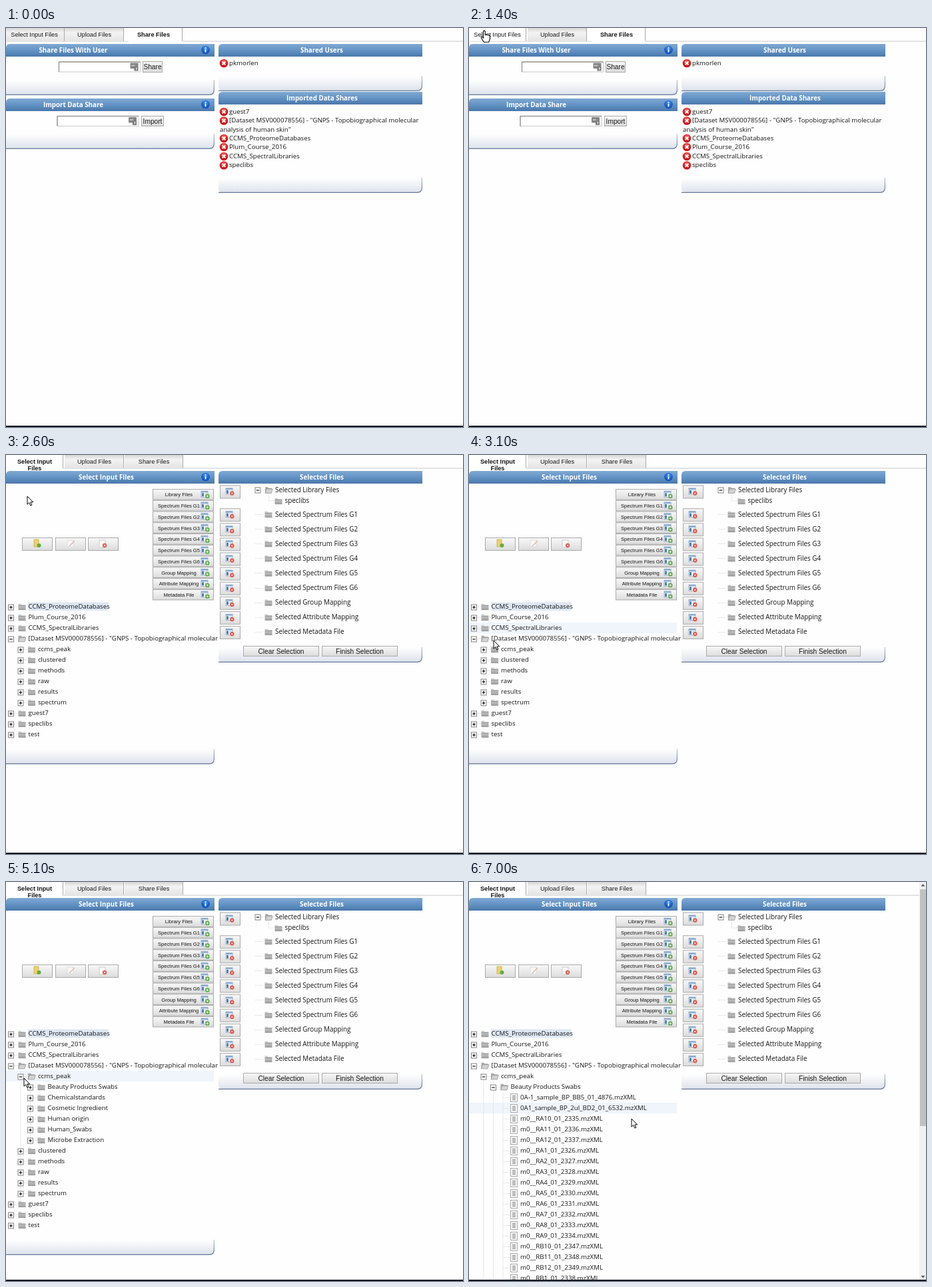
An HTML page that plays this animation: 686 px wide and 600 px high, repeating every 7100 ms.

```html
<!DOCTYPE html>
<html lang="en">
<head>
<meta charset="utf-8">
<title>File sharing</title>
<style>
html, body { margin: 0; width: 100%; height: 100%; overflow: hidden; background: #fefefe; }
svg { display: block; width: 686px; height: 600px; }
text { font: 9.7px "Open Sans", "Noto Sans", sans-serif; fill: #161616; }
.head { font-weight: 700; font-size: 9.8px; fill: #fff; text-anchor: middle; }
.tab, .button, .small { font-family: "Liberation Sans", Arial, sans-serif; text-anchor: middle; }
.tab { font-size: 9.2px; }
.bold { font-weight: 700; }
.button { font-size: 10.2px; }
.small { font-size: 7.6px; }
.list { font-size: 9.9px; }
.dots { stroke: #d6d6d6; stroke-dasharray: 1 1; fill: none; }
</style>
</head>
<body>
<svg viewBox="0 0 686 600">
  <defs>
    <linearGradient id="blue" x2="0" y2="1"><stop stop-color="#80a9d2"/><stop offset=".5" stop-color="#6393c5"/><stop offset="1" stop-color="#4a78ab"/></linearGradient>
    <linearGradient id="foot" x2="0" y2="1"><stop stop-color="#fff"/><stop offset="1" stop-color="#dce1eb"/></linearGradient>
    <linearGradient id="edge" x2="0" y2="1"><stop stop-color="#c5cedb"/><stop offset="1" stop-color="#62789a"/></linearGradient>
    <linearGradient id="btn" x2="0" y2="1"><stop stop-color="#f8f8f8"/><stop offset="1" stop-color="#dcdcdc"/></linearGradient>
    <linearGradient id="tabFill" x2="0" y2="1"><stop stop-color="#d6d6d6"/><stop offset=".35" stop-color="#f3f3f3"/><stop offset="1" stop-color="#e4e4e4"/></linearGradient>
    <linearGradient id="grey" x2="0" y2="1"><stop stop-color="#d0d0d0"/><stop offset="1" stop-color="#a0a0a0"/></linearGradient>
    <radialGradient id="red" cy=".3"><stop stop-color="#f36b62"/><stop offset="1" stop-color="#c9181b"/></radialGradient>
    <radialGradient id="info" cy=".3"><stop stop-color="#4c9cf4"/><stop offset="1" stop-color="#1458c0"/></radialGradient>
    <clipPath id="leftClip"><rect width="318" height="598"/></clipPath>
    <g id="remove"><circle r="6.3" fill="url(#red)"/><path d="M-2.4-2.4 2.4 2.4M2.4-2.4-2.4 2.4" stroke="#fff" stroke-width="2"/></g>
    <g id="infoIcon"><circle r="6.3" fill="url(#info)"/><path d="M0-3.7v1.6M0-1v4.6" stroke="#fff" stroke-width="1.7"/></g>
    <g id="folder"><path d="M-5.5 4.8v-9h4l1 1.4h6v7.6z" fill="url(#grey)"/><path d="M-5.5-1.4h11M-5 4.6h10.5" stroke="#858585" stroke-width=".7"/></g>
    <g id="openFolder"><path d="M-5.5 4.8v-9h4l1 1.4h5v2" fill="#aaa"/><path d="M-5.5 4.8l2-6.2h9.3l-1.8 6.2z" fill="#d3d3d3" stroke="#888" stroke-width=".7"/></g>
    <g id="page"><rect x="-5" y="-6" width="10" height="12" fill="#f8f8f8" stroke="#a2a2a2" stroke-width=".9"/><path d="M-2.5-3h5M-2.5-1h5M-2.5 1h5M-2.5 3h5" stroke="#777" stroke-width=".9"/></g>
    <g id="minus"><rect x="-4" y="-4" width="8" height="8" fill="#fff" stroke="#848484"/><path d="M-2.2 0h4.4" stroke="#111" stroke-width="1.2"/></g>
    <g id="plus"><use href="#minus"/><path d="M0-2.2v4.4" stroke="#111" stroke-width="1.2"/></g>
    <g id="sheet"><rect x="-6" y="-5" width="10" height="9" fill="#fff" stroke="#87a0bd" stroke-width=".8"/><rect x="-6" y="-5" width="10" height="2.2" fill="#86aad2"/><rect x="-5" y="-2" width="3" height="5" fill="#4d7daf"/><path d="M-1-1h4M-1 1h4" stroke="#aaa" stroke-width=".7"/></g>
    <g id="sheetAdd"><use href="#sheet"/><circle cx="3.3" cy="2.6" r="3.2" fill="#55a943"/><path d="M1.5 2.6h3.6M3.3.8v3.6" stroke="#fff"/></g>
    <g id="sheetDrop"><use href="#sheet"/><circle cx="3.3" cy="2.6" r="3.2" fill="#db5346"/><path d="M2 1.3l2.6 2.6m0-2.6L2 3.9" stroke="#fff" stroke-width=".9"/></g>
    <g id="keyIcon"><rect x="-6" y="-6" width="12" height="8.5" rx="1" fill="#858585"/><path d="M-4-2h5" stroke="#fff" stroke-width="1.3" stroke-dasharray="1.3 .8"/><path d="M0 0h6v6H0z" fill="#777"/><path d="M2 1.5h2v1.5H3v2" stroke="#fff" stroke-width=".8" fill="none"/></g>
    <path id="arrow" d="M0 0v12.2l2.8-2.6 2 4.5 2-.9-2-4.3h3.9z" fill="#fff" stroke="#000"/>
    <path id="hand" d="M-1.5 1q1.4-1.8 2.8 0v5.3q1.3-1 2.6.2 1.4-.8 2.4.5 1.7-.4 2.2 1.2v4.3l-1.8 4.7H-.6l-4-6.2q-.6-2.2 1.3-1.8L-1.5 11z" fill="#fff" stroke="#000" stroke-width="1.1"/>
  </defs>
  <g id="stage"></g>
</svg>
<script>
const LOOP = 7100, STEP = 100;
const SWITCH_AT = 2400, OPEN_FOLDER_AT = 4700, OPEN_FILES_AT = 6700;
const stage = document.getElementById('stage');
const DATASET = '[Dataset MSV000078556] - "GNPS - Topobiographical molecular';
const COURSE = 'Plum_Course_2016';

// time, x, y of the pointer tip
const PATH = [
  [100, 530, 560], [500, 492, 365], [800, 428, 182], [1200, 62, 18], [1400, 23, 4],
  [2200, 31, 6], [2400, 31, 8], [2600, 32, 62], [3000, 36, 262], [3100, 37, 279],
  [4100, 34, 296], [4500, 21, 291], [4700, 21, 291], [5100, 27, 295],
  [5700, 35, 306], [6700, 36, 306], [6900, 190, 341], [7000, 244, 356]
];

const text = (x, y, label, cls = '') => `<text x="${x}" y="${y + 3.5}" class="${cls}">${label}</text>`;
const icon = (name, x, y) => `<use href="#${name}" x="${x}" y="${y}"/>`;
const rect = (x, y, w, h, fill, extra = '') => `<rect x="${x}" y="${y}" width="${w}" height="${h}" fill="${fill}" ${extra}/>`;
const path = (d, extra) => `<path d="${d}" ${extra}/>`;
const dots = d => path(d, 'class="dots"');
const range = (n, fn) => Array.from({ length: n }, (_, i) => fn(i)).join('');
const box = (x, y, w, h) => rect(x + .5, y + .5, w - 1, h - 1, 'url(#btn)', 'stroke="#aaa"');
const button = (x, y, w, h, label) => box(x, y, w, h) + text(x + w / 2, y + h / 2, label, 'button');

function panel(x, right, top, bottom, title, titleX, info) {
  const f = bottom - 23;
  return path(`M${x} ${f}H${right}V${bottom - 8}Q${right} ${bottom} ${right - 8} ${bottom}H${x + (x ? 7 : 0)}${x ? `Q${x} ${bottom} ${x} ${bottom - 7}` : ''}Z`, 'fill="url(#foot)"')
    + path(`M${x} ${bottom - .7}H${right - 8}Q${right - .6} ${bottom - .7} ${right - .6} ${bottom - 8}V${f}`, 'fill="none" stroke="url(#edge)" stroke-width="1.3"')
    + path(`M${x} ${top + 19}V${top + 6}Q${x} ${top} ${x + 6} ${top}H${right}V${top + 19}Z`, 'fill="url(#blue)"')
    + text(titleX, top + 9, title, 'head')
    + (info ? icon('infoIcon', 299.5, top + 9) : '');
}

function tab(x, w, fill, label, cls = '') {
  return rect(x, 0, w, 19.5, fill)
    + path(`M${x + w - .5} 0V19.5`, 'stroke="#aaa"')
    + (label ? text(x + w / 2, 9, label, 'tab ' + cls) : '');
}

function tabs(sharing, hovering) {
  const line = path(sharing ? 'M0 20H184M265 20H686' : 'M85 20H686', 'stroke="#c9c9c9"');
  return sharing
    ? line + tab(0, hovering ? 86 : 88, hovering ? '#fff' : 'url(#tabFill)', '') + text(42.5, 9, 'Select Input Files', 'tab')
      + tab(88, 89, 'url(#tabFill)', 'Upload Files') + tab(178, 87, '#fff', 'Share Files', 'bold')
    : line + tab(0, 86, '#fff', '') + text(43, 9, 'Select Input', 'tab bold') + text(43, 19.5, 'Files', 'tab bold')
      + tab(88, 89, 'url(#tabFill)', 'Upload Files') + tab(178, 88, 'url(#tabFill)', 'Share Files');
}

function field(x, y) {
  return rect(x, y, 122, 15, '#fff', 'stroke="#c8c8c8"')
    + path(`M${x} ${y + 15}V${y}H${x + 122}`, 'fill="none" stroke="#777"') + icon('keyIcon', x + 113, y + 7.5);
}

function sharePage() {
  const shares = [[125, 'guest7'], [138.5, DATASET], [165, 'CCMS_ProteomeDatabases'], [178, COURSE],
    [192, 'CCMS_SpectralLibraries'], [205.5, 'speclibs']];
  const entry = ([y, label]) => icon('remove', 327, y + 1) + text(335, y, label);
  return panel(0, 313, 24, 101, 'Share Files With User', 101, true)
    + field(79.5, 51) + button(205, 50, 30, 17, 'Share')
    + panel(0, 313, 106, 182, 'Import Data Share', 101, true)
    + field(77, 132.5) + button(203, 132, 34, 16, 'Import')
    + panel(319, 625, 24, 95, 'Shared Users', 474) + entry([52, 'pkmorlen'])
    + panel(319, 625, 96, 248, 'Imported Data Shares', 474.5)
    + shares.map(entry).join('') + text(321, 152, 'analysis of human skin"');
}

function sampleFile(i) {
  const n = (i + 9) % 12 + 1, block = Math.floor(i / 12);
  return `m0__R${'AB'[block]}${n}_01_${2325 + n + 12 * block}.mzXML`;
}

// rows as [depth, label, icon]
function treeRows(level) {
  const closed = (depth, names) => names.map(name => [depth, name, 'plus']);
  const swabs = level < 2 ? closed(2, ['Beauty Products Swabs']) : [
    [2, 'Beauty Products Swabs', 'minus'],
    ...['0A-1_sample_BP_BB5_01_4876.mzXML', '0A1_sample_BP_2ul_BD2_01_6532.mzXML',
      ...Array.from({ length: 16 }, (_, i) => sampleFile(i))].map(name => [3, name, 'page'])];
  const peak = level < 1 ? [] : [...swabs, ...closed(2, ['Chemicalstandards', 'Cosmetic Ingredient',
    'Human origin', 'Human_Swabs', 'Microbe Extraction'])];
  return [
    ...closed(0, ['CCMS_ProteomeDatabases', COURSE, 'CCMS_SpectralLibraries']),
    [0, DATASET, 'minus'], [1, 'ccms_peak', level ? 'minus' : 'plus'], ...peak,
    ...closed(1, ['clustered', 'methods', 'raw', 'results', 'spectrum']),
    ...closed(0, ['guest7', 'speclibs', 'test'])];
}

function tree(rows, hoverY) {
  const hover = Math.floor((hoverY - 220) / 16);
  return rows.map(([depth, label, kind], i) => {
    const y = 228 + 16 * i, x = 7 + 14.5 * depth;
    if (y > 610) return '';
    return (i === hover ? rect(0, y - 8, 312, 16, '#f0f5fb') : '')
      + (i ? '' : rect(33, y - 6.5, 120.5, 12.5, '#dde7f3'))
      + range(depth, d => dots(`M${22 + 14.5 * d} ${y - 8}v16`))
      + dots(`M${x} ${y + .5}h11`)
      + (kind === 'page' ? icon('page', x + 17, y + .5)
        : icon(kind, x + .5, y + 1) + icon(kind === 'minus' ? 'openFolder' : 'folder', x + 17, y))
      + text(x + 26.5, y - .5, label);
  }).join('');
}

function toolbar() {
  const groups = ['Library Files', ...Array.from({ length: 6 }, (_, i) => `Spectrum Files G${i + 1}`),
    'Group Mapping', 'Attribute Mapping', 'Metadata File'];
  const tools = [24, 74, 123].map(x => box(x, 124, 46, 20)).join('')
    + rect(42, 127, 7, 11, '#ecd16e', 'stroke="#c2a743" stroke-width=".7"') + `<circle cx="49.5" cy="136" r="3" fill="#62ac45"/>`
    + rect(92, 128, 9, 10, '#f7f7f7', 'stroke="#ddd"') + path('M95 137l8-8', 'stroke="#d5b9b0" stroke-width="1.5"')
    + rect(140, 128, 9, 11, '#fafafa', 'stroke="#ccc"') + `<circle cx="148" cy="136" r="3.2" fill="#de5b50"/>`
    + path('M146.8 134.8l2.4 2.4m0-2.4l-2.4 2.4', 'stroke="#fff"');
  return tools + groups.map((label, i) => {
    const y = 59.3 + 16.75 * i;
    return box(220, y - 8.2, 92, 16.6) + text(259.5, y - .5, label, 'small') + icon('sheetAdd', 299, y);
  }).join('');
}

function selectedFiles() {
  const drop = y => box(321, y - 9.5, 31, 20) + icon('sheetDrop', 336, y);
  const names = [...Array.from({ length: 6 }, (_, i) => `Spectrum Files G${i + 1}`),
    'Group Mapping', 'Attribute Mapping', 'Metadata File'];
  return panel(319, 625, 24, 312, 'Selected Files', 474)
    + drop(55) + dots('M378 52.5h11M394.5 58v11h9') + icon('minus', 378, 53) + icon('openFolder', 394.5, 52.5)
    + text(404, 52, 'Selected Library Files', 'list') + icon('folder', 409, 69) + text(418.5, 68.5, 'speclibs', 'list')
    + names.map((name, i) => {
      const y = 89 + 22.1 * i;
      return drop(y + .7) + dots(`M374 ${Math.round(y) + .5}h12`) + icon('folder', 394, y)
        + text(404, y, 'Selected ' + name, 'list');
    }).join('')
    + button(356, 287, 114, 16, 'Clear Selection') + button(474, 287, 114, 16, 'Finish Selection');
}

function scrollbar() {
  return rect(676, 0, 10, 598, '#f1f1f1') + rect(677, 11, 9, 356, '#c1c1c1')
    + path('M678.5 6.5l3-3.5 3 3.5zM678.5 592l3 3.5 3-3.5z', 'fill="#555"');
}

function selectPage(t, hoverY) {
  const level = t < OPEN_FOLDER_AT ? 0 : t < OPEN_FILES_AT ? 1 : 2;
  const rows = treeRows(level);
  return `<g clip-path="url(#leftClip)">${panel(0, 313, 24, 257 + 16 * rows.length, 'Select Input Files', 150.5, true)}`
    + toolbar() + tree(rows, hoverY) + '</g>' + selectedFiles() + (level === 2 ? scrollbar() : '');
}

function pointer(t) {
  const next = PATH.findIndex(p => p[0] > t);
  if (next < 0) return PATH[PATH.length - 1].slice(1);
  if (!next) return PATH[0].slice(1);
  const [t0, x0, y0] = PATH[next - 1], [t1, x1, y1] = PATH[next];
  const k = (t - t0) / (t1 - t0);
  return [x0 + (x1 - x0) * k, y0 + (y1 - y0) * k];
}

function draw(t) {
  const sharing = t < SWITCH_AT;
  const [x, y] = pointer(t);
  const hovering = sharing && x < 86 && y < 20;
  stage.innerHTML = tabs(sharing, hovering)
    + (sharing ? sharePage() : selectPage(t, pointer(t - STEP)[1]))
    + rect(0, 598, 686, 2, '#141821')
    + (t >= PATH[0][0] ? icon(hovering ? 'hand' : 'arrow', x, y) : '');
}

let start, shown = -1;
function tick(now) {
  start ??= now;
  const t = Math.floor((now - start) % LOOP / STEP) * STEP;
  if (t !== shown) draw(shown = t);
  requestAnimationFrame(tick);
}
draw(0);
requestAnimationFrame(tick);
</script>
</body>
</html>
```
